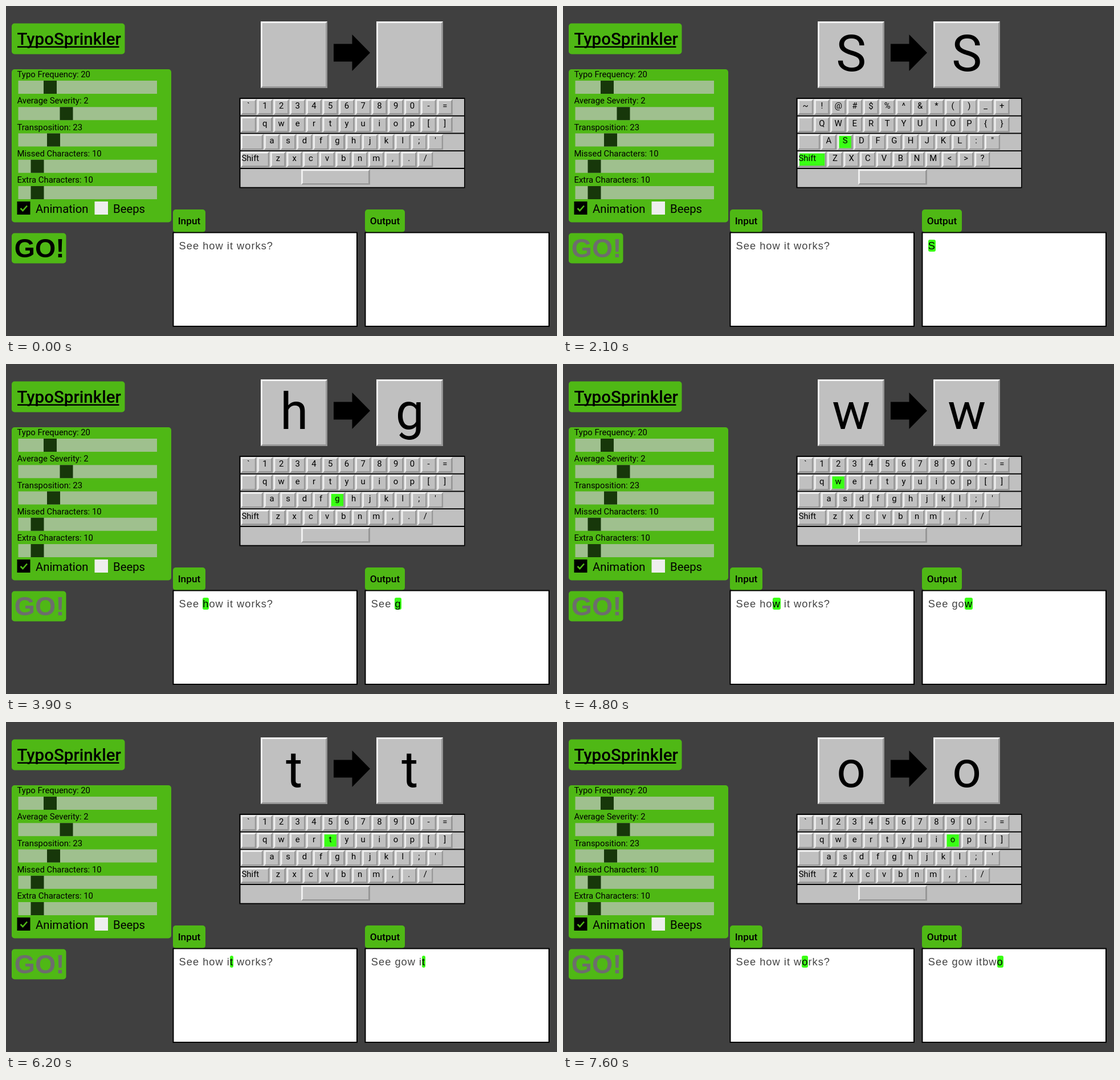
Animation of 967 by 579 pixels, one loop 8000 ms. Source, as an HTML page:

```html
<!DOCTYPE html>
<html lang="en">
<head>
<meta charset="utf-8">
<title>TypoSprinkler</title>
<style>
html, body { margin: 0; width: 100%; height: 100%; overflow: hidden; background: #404040; }
svg { position: absolute; left: 0; top: 0; font-family: Roboto, sans-serif; }
.line {
  position: absolute; top: 410px; white-space: pre; color: #444;
  font: 18.3px "Liberation Sans", Arial, sans-serif; letter-spacing: 1px;
}
.line span { background: #39ff14; color: #000; border-radius: 3px; }
</style>
</head>
<body>
<svg id="stage" width="967" height="579" viewBox="0 0 967 579"></svg>
<div class="line" id="input" style="left:303.6px"></div>
<div class="line" id="output" style="left:640.8px"></div>
<script>
const GREEN = '#4fb815', LIT = '#39ff14', GREY = '#c0c0c0';
const LOOP = 8000;
const INPUT = 'See how it works?', TYPED = 'See gow itbwo';
const TIMES = [2100, 2500, 3000, 3400, 3900, 4400, 4800, 5300, 5800, 6200, 6700, 7200, 7600];
const stage = document.getElementById('stage');

function add(tag, attrs) {
  const node = document.createElementNS('http://www.w3.org/2000/svg', tag);
  for (const k in attrs) node.setAttribute(k, attrs[k]);
  return stage.appendChild(node);
}
const rect = (x, y, width, height, fill, rx = 0) => add('rect', { x, y, width, height, fill, rx });
const path = (d, fill) => add('path', { d, fill });

function text(str, x, y, size, attrs) {
  const node = add('text', { x, y, 'font-size': size, ...attrs });
  node.textContent = str;
  return node;
}

// Raised box with mitred edges; returns its face.
function bevel(x, y, w, h, b) {
  rect(x, y, w, h, '#efefef');
  path(`M${x + w} ${y}v${h}h${-w}l${b} ${-b}h${w - 2 * b}v${2 * b - h}z`, '#979797');
  return rect(x + b, y + b, w - 2 * b, h - 2 * b, GREY);
}

// Title and settings
rect(10, 30.5, 198.5, 54, GREEN, 5);
text('TypoSprinkler', 19.5, 68, 29.5, { 'font-weight': 500 });
rect(20, 70.5, 178.5, 2.5, '#000');

rect(10, 111, 280, 268.5, GREEN, 5);
[
  ['Typo Frequency: 20', 66],
  ['Average Severity: 2', 94.5],
  ['Transposition: 23', 72],
  ['Missed Characters: 10', 43.5],
  ['Extra Characters: 10', 43.5]
].forEach(([label, thumb], i) => {
  const y = 131 + i * 46.25;
  text(label, 19.5, y - 6, 14.9);
  rect(21.5, y, 243.5, 23, '#9fc08e');
  rect(thumb, y, 23, 23, '#17370a');
});

rect(19.5, 343, 23, 23, '#000');
add('path', { d: 'M25.5 355l4 4l7.5-8.5', fill: 'none', stroke: GREEN, 'stroke-width': 2.6 });
text('Animation', 52, 362.5, 20.3);
rect(155.5, 343, 23.5, 23, '#eee');
text('Beeps', 188, 362.5, 20.3);

rect(10, 398.5, 95.5, 53, GREEN, 5);
const go = text('GO!', 14.8, 440.5, 46.5, {
  'font-family': '"Liberation Sans", Arial, sans-serif', 'font-weight': 700
});

// Before and after keys
const bigLabels = [447, 650].map(x => {
  bevel(x, 27, 117, 117, 3);
  return text('', x + 58.7, 114, 89, { 'text-anchor': 'middle' });
});
path('M575 66.5h32.5v-16.5l31.5 32l-31.5 32v-16.5h-32.5z', '#000');

// Keyboard
const keys = [];
rect(409.5, 161, 396, 158.5, '#000');

function key(x, y, w, low = '', high = '') {
  const face = bevel(x, y, w, 27.5, 3);
  const label = low === 'Shift'
    ? text(low, 413.5, y + 8.5 + 8, 14.9)
    : text(low, x + w / 2, y + 16.5, 14.9, { 'text-anchor': 'middle' });
  keys.push({ face, label, low, high });
}

[
  ['`1234567890-=', '~!@#$%^&*()_+', 412],
  ['qwertyuiop[]', 'QWERTYUIOP{}', 440.7, 27.3],
  ["asdfghjkl;'", 'ASDFGHJKL:"', 452.8, 39.3],
  ['zxcvbnm,./', 'ZXCVBNM<>?', 463.8, 50.3, 'Shift']
].forEach(([low, high, x, lead, name], row) => {
  const y = 163.5 + row * 30.7;
  rect(411.5, y - 0.5, 392.5, 28.8, GREY);
  if (lead) key(412, y, lead, name, name);
  [...low].forEach((c, i) => key(x + i * 28.72, y, 27.3, c, high[i]));
});
rect(411.5, 286, 392.5, 31.7, GREY);
key(518, 286.3, 121, ' ', ' ');

// Text panes
[['Input', 293, 57], ['Output', 630, 70]].forEach(([name, x, w]) => {
  rect(x, 357, w, 40, GREEN, 5);
  text(name, x + w / 2, 383, 17.3, { 'font-weight': 500, 'text-anchor': 'middle' });
  rect(x - 0.5, 396.5, 324.5, 166.5, '#000');
  rect(x + 1.5, 398.5, 320.5, 162.5, '#fff');
});

function showLine(id, str, at) {
  const line = document.getElementById(id);
  line.textContent = '';
  if (at < 0) { line.append(str); return; }
  const mark = document.createElement('span');
  mark.textContent = str[at];
  line.append(str.slice(0, at), mark, str.slice(at + 1));
}

function showStep(step) {
  const typed = TYPED[step] || '', first = step === 0;
  bigLabels[0].textContent = INPUT[step] || '';
  bigLabels[1].textContent = typed;
  for (const k of keys) {
    const name = first ? k.high : k.low;
    const lit = typed && name === typed || first && name === 'Shift';
    k.label.textContent = name;
    k.face.setAttribute('fill', lit ? LIT : GREY);
  }
  showLine('input', INPUT, first ? -1 : step);
  showLine('output', TYPED.slice(0, step + 1), typed === ' ' ? -1 : step);
}

const start = performance.now();
let shown;

function tick() {
  const t = (performance.now() - start) % LOOP;
  const step = TIMES.filter(at => at <= t).length - 1;
  go.setAttribute('fill', t < 1500 ? '#000' : t < 1600 ? '#3a3f38' : '#6d6d6d');
  if (step !== shown) showStep(shown = step);
  requestAnimationFrame(tick);
}
tick();
</script>
</body>
</html>
```
